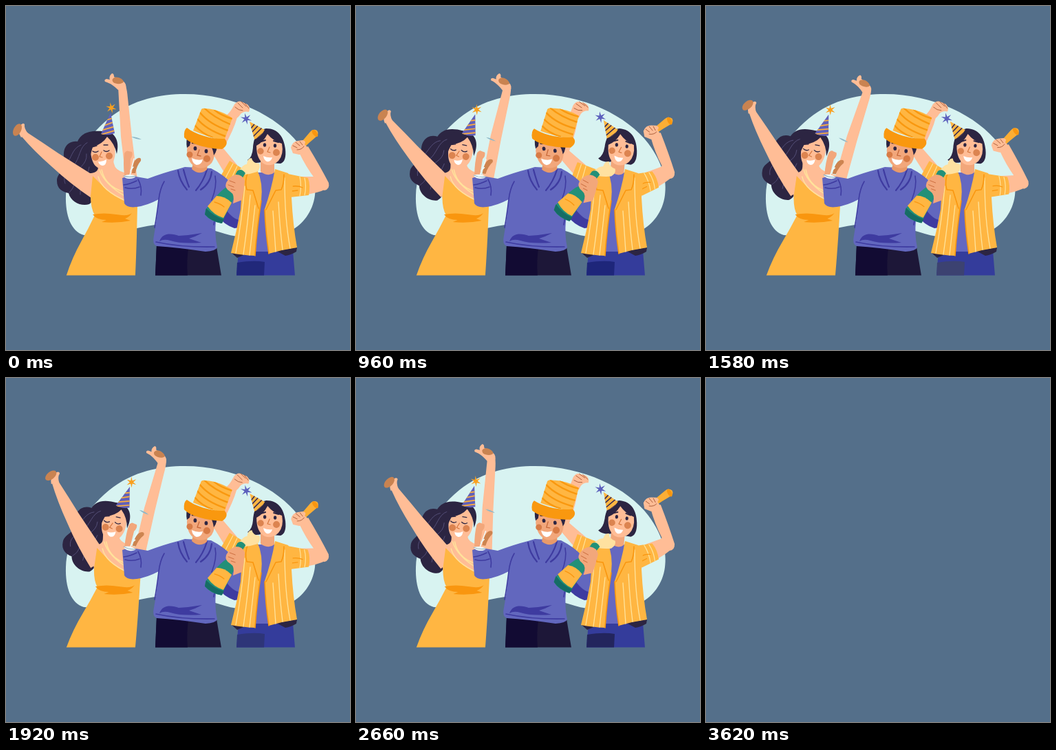
Recreate the animation shown at these times as an HTML page. Size 500 by 500 pixels, loop 3640 ms.

```html
<!DOCTYPE html>
<html lang="en">
<head>
<meta charset="utf-8">
<title>Party</title>
<style>
html, body { margin: 0; width: 100%; height: 100%; overflow: hidden; background: #546f8a; }
svg { display: block; width: 100vw; height: 100vh; }
.line { fill: none; stroke-linecap: round; stroke-linejoin: round; }
</style>
</head>
<body>
<svg viewBox="0 0 500 500">
<defs>
  <clipPath id="floor"><rect width="500" height="391.5"/></clipPath>
  <clipPath id="crown"><path d="M284 150Q286 148 290 149C305 150 320 156 329 163L317 196Q292 190 272 181Z"/></clipPath>
  <clipPath id="cone1"><path d="M138 186Q148 189 158 185L152 155Z"/></clipPath>
  <clipPath id="cone2"><path d="M361 194Q371 190 376 180L354 168Z"/></clipPath>
</defs>
<rect width="500" height="500" fill="#546f8a"/>
<g id="scene" clip-path="url(#floor)">
  <path fill="#d8f3f1" d="M260 128C330 128 395 160 425 200C447 230 452 255 449 275C446 300 430 318 415 326C385 336 345 340 318 331C285 320 255 315 217 318C185 322 150 336 113 333C95 328 86 305 87 275C88 235 112 195 150 163C185 135 225 128 260 128Z"/>

  <!-- woman in the dress -->
  <g class="head1">
    <path fill="#2c2542" d="M140 182C116 180 108 188 104 197C88 195 80 210 86 226C88 238 74 242 74 254C74 266 82 270 91 272C94 285 110 292 121 288C130 282 131 262 133 245L140 215Z"/>
    <g class="line" stroke="#5b5680" stroke-width=".8">
      <path d="M119 198C106 204 108 222 98 232S82 247 86 258M117 215C119 232 101 235 100 250S96 266 92 271M109 202C98 206 96 217 91 225M121 234C118 252 107 255 108 274"/>
    </g>
  </g>
  <g id="armR">
    <path fill="#ffbd96" d="M163 117L174 116Q176 122 177 134L183 190L190 245L195 275H177L167 190Z"/>
    <g id="palm">
      <path fill="#ffbd96" d="M163 122C159 118 152 112 144 110Q142 107 146 106L151 107Q149 102 154 98Q157 98 157 103L170 109Q176 113 174 121Z"/>
      <path fill="#c98351" d="M156 105C161 101 170 106 171 110C169 114 160 114 156 111Q153 107 156 105Z"/>
    </g>
  </g>
  <path class="lean" fill="#ffbd96" d="M134 222L156 222Q156 236 166 240L188 248L191 292L124 285L118 243Q134 244 134 234Z"/>
  <g id="armL">
    <path fill="#ffbd96" d="M31 184Q54 199 76 214L122 243Q140 260 124 279Q94 259 66 233Q40 210 23 190Z"/>
    <path fill="#ffbd96" d="M22 191Q17 184 19 177Q24 168 27 172Q26 178 32 185Z"/>
    <ellipse cx="16.5" cy="180" rx="5.5" ry="9.5" fill="#c98351" transform="rotate(27 16.5 180)"/>
  </g>
  <g class="lean">
    <path fill="#ffb642" d="M126 247L147 268Q168 285 191 289L190 335Q189 370 187.5 400H84L88 391Q96 366 110 341Q120 323 129 304Q123 294 123 276Z"/>
    <path fill="#f9960f" d="M126 303Q142 300 160 303T183 301Q179 307 173 309L181 312Q162 316 139 314L146 311Q132 311 126 303Z"/>
    <path class="line" stroke="#ffe39b" stroke-width="1.4" d="M136 238Q143 260 176 278M139 238Q145 266 180 272M134 248Q139 268 174 283"/>
  </g>
  <g class="head1">
    <path fill="#ffbd96" d="M123 203C122 230 132 237 141 237C154 237 161 222 158 203L147 186L130 190Z"/>
    <path fill="#2c2542" d="M122 219C112 200 121 183 140 182C157 181 166 194 161 215Q158 200 147 190Q141 200 126 205Z"/>
    <g fill="#dc8450"><circle cx="130" cy="220" r="5"/><circle cx="150" cy="218" r="5"/></g>
    <path class="line" stroke="#2c2542" stroke-width="1.3" d="M126 211Q130 214 134 211M142 210Q146 213 150 210M125 205L132 203M142 202L148 202"/>
    <path class="line" stroke="#d5773f" stroke-width="1.2" d="M139 212L136 219L140 220"/>
    <path fill="#fff" d="M134 226Q140 227 146 223Q146 232 140 232Q135 231 134 226Z"/>
    <path fill="#6261b9" d="M138 186Q148 189 158 185L152 155Z"/>
    <path class="line" clip-path="url(#cone1)" stroke="#ffb03a" stroke-width="1.7" d="M138 181L158 175M138 187L158 181M142 174L158 168M142 167L158 162"/>
    <path id="star1" fill="#f9a01f"/>
  </g>

  <!-- right woman's raised fist -->
  <g id="fist">
    <path fill="#ffbd96" d="M321 158L336 162Q331 180 316 207L336 231L322 250L302 217Q298 209 303 201Z"/>
    <path fill="#ffbd96" d="M320 159Q326 155 332 143Q337 137 342 139L351 143Q356 148 353 154Q346 152 341 157Q336 165 331 164Z"/>
    <path class="line" stroke="#a85b38" stroke-width=".9" d="M337 141L344 148M342 139L349 146M347 141L353 149M333 147Q338 152 344 152"/>
    <path fill="#ffb642" d="M325 225L350 240L343 262L312 247Z"/>
    <path class="line" stroke="#ffe39b" stroke-width="1.1" d="M330 229L319 250M336 233L326 254"/>
  </g>

  <!-- man -->
  <path fill="#1d1738" d="M219 346L306 350L313 392H217Z"/>
  <path fill="#120b33" d="M219 346H266Q262 370 264 392H217Z"/>
  <path fill="#3e3ba0" d="M305 250Q335 268 345 288V314Q341 323 332 323Q317 318 306 304Z"/>
  <path fill="#6267be" d="M260 234L298 236Q318 246 330 260L345 281Q348 292 343 311Q332 313 318 294L305 312Q303 333 307 351Q305 356 290 357Q250 351 219 349Q212 346 215 334Q219 312 222 281Q205 290 190 292Q176 294 172 287L169 250Q177 246 189 248L206 251Q230 242 250 237Z"/>
  <path class="line" stroke="#3e3ba0" stroke-width="1.6" d="M171 260Q180 259 190 254M173 264Q184 267 194 263M192 252Q198 263 196 275M230 255Q224 265 222 281M222 281Q219 306 216 322M304 247Q307 262 299 282M305 285Q305 303 302 318M218 343Q255 351 303 350"/>
  <path class="line" stroke="#3e3ba0" stroke-width="2.2" d="M258 238Q262 253 266 263M250 239Q252 254 263 267M292 238Q287 255 276 268M299 241Q297 258 283 267"/>
  <path fill="#3e3ba0" d="M223 342C228 328 242 331 251 334Q268 333 285 330Q276 335 266 338L284 344Q254 346 239 341Q229 338 223 342Z"/>
  <g id="head2">
    <path fill="#e99a6a" d="M272 228H293L292 238Q281 247 270 237Z"/>
    <path fill="#f2a77b" d="M265 188L304 198Q305 219 299 228Q290 238 278 235Q264 230 263 210Z"/>
    <path fill="#2c2542" d="M265 185L271 190Q268 197 267 203L263 206Q261 196 265 185ZM300 198L306 200Q308 210 302 217Q301 209 298 204Z"/>
    <g fill="#d77b46"><circle cx="267" cy="216" r="4.5"/><circle cx="292" cy="222" r="5"/></g>
    <g fill="#2c2542"><ellipse cx="275" cy="207" rx="2.4" ry="2.9"/><ellipse cx="291" cy="211" rx="2.4" ry="2.9"/></g>
    <path class="line" stroke="#2c2542" stroke-width="2.4" d="M271 199L278 199M288 202L296 204"/>
    <path class="line" stroke="#c8693a" stroke-width="1.3" d="M281 209L278 217L283 218"/>
    <path fill="#fff" d="M270 221Q278 225 286 223Q284 231 277 231Q271 229 270 221Z"/>
    <path fill="#ffb642" d="M284 150Q286 148 290 149C305 150 320 156 329 163L317 196Q292 190 272 181Z"/>
    <path class="line" clip-path="url(#crown)" stroke="#f9980f" stroke-width="2.4" d="M289 149Q302 162 326 172M282 155Q296 172 323 181M278 164Q290 179 318 189M274 173Q284 185 300 191M303 151Q312 159 329 164"/>
    <path fill="#f9980f" d="M263 177C276 187 300 194 318 193Q325 201 314 208C292 207 268 201 259 191Q258 180 263 177Z"/>
  </g>
  <g id="glass">
    <path fill="#8eb8c8" d="M182 190Q190 190 197 194Q189 194 182 190Z"/>
    <path fill="#cd8450" d="M183 243L184 233Q187 222 192 221Q197 220 196 225Q190 232 188 243Z"/>
    <path fill="#f2a77b" d="M172 246Q170 228 172 214Q175 209 178 211L183 212Q185 217 181 222L180 247Z"/>
    <path class="line" stroke="#eefafa" stroke-width="1.5" d="M186 222L180 246M181 239L185 234"/>
    <path fill="#eefafa" d="M171 247Q180 243 189 247Q187 251 179 251Q173 251 171 247Z"/>
    <path class="line" stroke="#86a7bb" stroke-width="1" d="M171 247Q180 250 189 247"/>
  </g>

  <!-- right woman -->
  <path fill="#343c9b" d="M338 356H417L420 392H335Z"/>
  <path id="leg" d="M336 373Q360 369 376 372L375 392H335Z"/>
  <path fill="#6568c0" d="M357 242H402L382 357H362Z"/>
  <g id="upper">
    <g id="fore">
      <path fill="#fcae35" d="M425 203L442 183Q446 178 452 181Q455 185 452 189Q441 198 430 209Z"/>
      <ellipse cx="449" cy="185" rx="3" ry="6" fill="#f9960f" transform="rotate(-38 449 185)"/>
      <path fill="#ffbd96" d="M426 213L439 204Q456 232 469 257Q471 266 463 268L446 262L449 251Q436 234 426 213Z"/>
      <path fill="#ffbd96" d="M414 206Q416 197 424 196L431 195Q437 196 434 201L440 207Q434 216 426 216L417 214Z"/>
      <path class="line" stroke="#a85b38" stroke-width=".9" d="M417 203L423 206M421 198L427 203M427 197L431 202M423 209Q430 209 433 204"/>
    </g>
    <path fill="#ffbd96" d="M430 248L462 248Q469 257 465 266Q454 272 430 275Z"/>
    <path fill="#ffb642" d="M400 242L439 250Q443 262 440 275L413 278Z"/>
    <path class="line" stroke="#ffe39b" stroke-width="1.2" d="M434 250Q437 262 434 275M427 248Q430 262 427 276"/>
    <path class="line" stroke="#f9960f" stroke-width="1.3" d="M417 262Q425 261 431 264M416 269L424 268"/>
  </g>
  <path fill="#2c2542" d="M327 358L348 361L336 366ZM393 356L423 351L422 357Q414 362 406 363Z"/>
  <path fill="#ffb642" d="M348 239L365 238Q374 257 371 283Q365 320 362 363Q343 362 327 359Q335 328 341 296L343 262Z"/>
  <path fill="#ffb642" d="M391 237L410 243L417 256L415 278Q417 318 423 351Q402 354 382 360Q377 325 376 295Q386 266 391 237Z"/>
  <path class="line" stroke="#ffe39b" stroke-width="1.3" d="M347 262Q343 310 334 359M355 275Q351 320 345 361M362 290Q358 325 354 362M388 298L392 357M396 285Q398 322 402 354M405 250Q405 310 413 352"/>
  <path class="line" stroke="#f9960f" stroke-width="1.6" d="M352 241Q346 255 350 267L359 268L367 294M404 245Q404 259 400 267L392 268L378 296M371 283Q365 320 362 363M376 296Q377 326 382 360"/>
  <g id="head3">
    <path fill="#2c2542" d="M378 178C363 181 360 194 359 206Q358 220 351 224Q358 230 371 227L399 229Q408 226 406 208C404 191 396 178 378 178Z"/>
    <path fill="#f2a77b" d="M370 222H390V242Q382 249 370 241Z"/>
    <path fill="#ffbd96" d="M364 203Q374 198 380 186Q388 196 401 200Q404 216 396 225Q387 234 376 230Q364 224 364 203Z"/>
    <g fill="#dc8450"><circle cx="370" cy="211" r="4.7"/><circle cx="393" cy="213" r="5"/></g>
    <g fill="#2c2542"><ellipse cx="376" cy="202" rx="2.2" ry="2.7"/><ellipse cx="391" cy="203" rx="2.2" ry="2.7"/></g>
    <path class="line" stroke="#2c2542" stroke-width="1.9" d="M371 197L377 195M389 196L396 198"/>
    <path class="line" stroke="#d5773f" stroke-width="1.2" d="M383 205L380 212L384 213"/>
    <path fill="#fff" d="M374 218Q380 221 387 220Q385 227 379 226Q375 224 374 218Z"/>
    <path fill="#ffb642" d="M361 194Q371 190 376 180L354 168Z"/>
    <path class="line" clip-path="url(#cone2)" stroke="#342b55" stroke-width="1.6" d="M356 178L364 168M355 186L369 171M358 191L374 175M361 196L378 181"/>
    <path id="star2" fill="#5c60bd"/>
  </g>

  <!-- bottle -->
  <g id="bottle">
    <path id="foam" fill="#ffe1a0" d="M339 239Q345 230 350 230Q351 221 357 221Q358 228 368 229Q371 235 365 241Q356 244 347 245Z"/>
    <path fill="#229078" d="M290 296L306 276Q318 263 325 261L336 240Q342 235 348 243L334 266Q332 281 324 294L313 316Q297 313 289 303Z"/>
    <path fill="#ffb642" d="M293 291L306 276Q318 276 328 286L316 308Q302 304 293 291Z"/>
    <path fill="#166c65" d="M291 294Q302 306 317 310L314 316Q298 313 289 303Z"/>
    <path class="line" stroke="#f9960f" stroke-width="1.3" d="M303 285Q311 287 317 292"/>
    <path fill="#f2a77b" d="M320 257Q325 247 334 245Q344 245 347 254Q346 268 343 282L330 287Q333 274 326 270Q317 265 320 257Z"/>
    <path class="line" stroke="#c8693a" stroke-width=".9" d="M325 254L333 257M323 260L331 263M327 266L333 268"/>
  </g>
</g>
</svg>
<script>
const LOOP = 3640, END = 3620, BEAT = 1800;
const times = [0, 500, 960, 1580, 2260, 3060];
const $ = id => document.getElementById(id);
const put = (els, v) => els.forEach(e => e.setAttribute('transform', v));
const all = c => [...document.getElementsByClassName(c)];
const heads = all('head1'), leans = all('lean');

// Rotate about a point, after moving dx to the right
const turn = (id, a, x, y, dx = 0) =>
  put([$(id)], `translate(${dx} 0) rotate(${a} ${x} ${y})`);

// Smooth periodic curve through one value per entry of times
function curve(v, t) {
  const n = times.length;
  const at = i => times[(i + n) % n] + LOOP * Math.floor(i / n);
  const val = i => v[(i + n) % n];
  const slope = i => (val(i + 1) - val(i - 1)) / (at(i + 1) - at(i - 1));
  let i = n - 1;
  while (times[i] > t) i--;
  const d = at(i + 1) - at(i), u = (t - at(i)) / d, s = 1 - u;
  return s * s * ((1 + 2 * u) * val(i) + u * d * slope(i)) +
    u * u * ((3 - 2 * u) * val(i + 1) - s * d * slope(i + 1));
}

function star(id, x, y, r) {
  let d = '';
  for (let k = 0; k < 12; k++) {
    const a = k * Math.PI / 6 + 0.3, q = k % 2 ? r * 0.32 : r;
    d += `${k ? 'L' : 'M'}${x + q * Math.cos(a)} ${y + q * Math.sin(a)}`;
  }
  $(id).setAttribute('d', d + 'Z');
}

function draw(t) {
  $('scene').style.display = t < END ? '' : 'none';

  const armL = curve([0, 4, 12, 22, 23, 8.5], t), sway = armL / 23;
  put(leans, `translate(0 392) skewX(${-2.37 * sway}) translate(0 -392)`);
  turn('armL', armL, 128, 262, 5.5 * sway);
  const armR = curve([0, 7.8, 17.9, 22.7, 15.1, 3.4], t);
  turn('armR', armR, 186, 272, 5 * sway);
  turn('palm', -armR * 0.5, 168, 118);
  const tilt = 12 * curve([0, 0.38, 0.88, 0.97, 1, 0.42], t);
  put(heads, `translate(${7.5 * sway} 0) rotate(${tilt} 148 250)`);
  turn('glass', curve([0, 1, 7, 11, 11, 0.5], t), 180, 247);

  const w = (1 - Math.cos(2 * Math.PI * t / BEAT)) / 2;
  turn('head2', -4 * w, 280, 235);
  turn('bottle', 8 * w, 335, 290);
  turn('foam', 6 * w, 345, 240);
  turn('fist', -9.5 * w, 335, 245);
  turn('upper', -20 * w, 410, 255, -5 * w);
  turn('fore', 30 * w, 460, 260);
  turn('head3', 5 * w, 380, 235);

  const rgb = [[33, 28, 30, 60, 30, 43], [40, 36, 38, 66, 38, 39], [122, 122, 122, 113, 122, 70]];
  $('leg').setAttribute('fill', `rgb(${rgb.map(c => Math.round(curve(c, t)))})`);
}

star('star1', 153, 148, 8);
star('star2', 349, 164, 8.5);
const start = performance.now();
function frame() {
  draw((performance.now() - start) % LOOP);
  requestAnimationFrame(frame);
}
draw(0);
requestAnimationFrame(frame);
</script>
</body>
</html>
```
